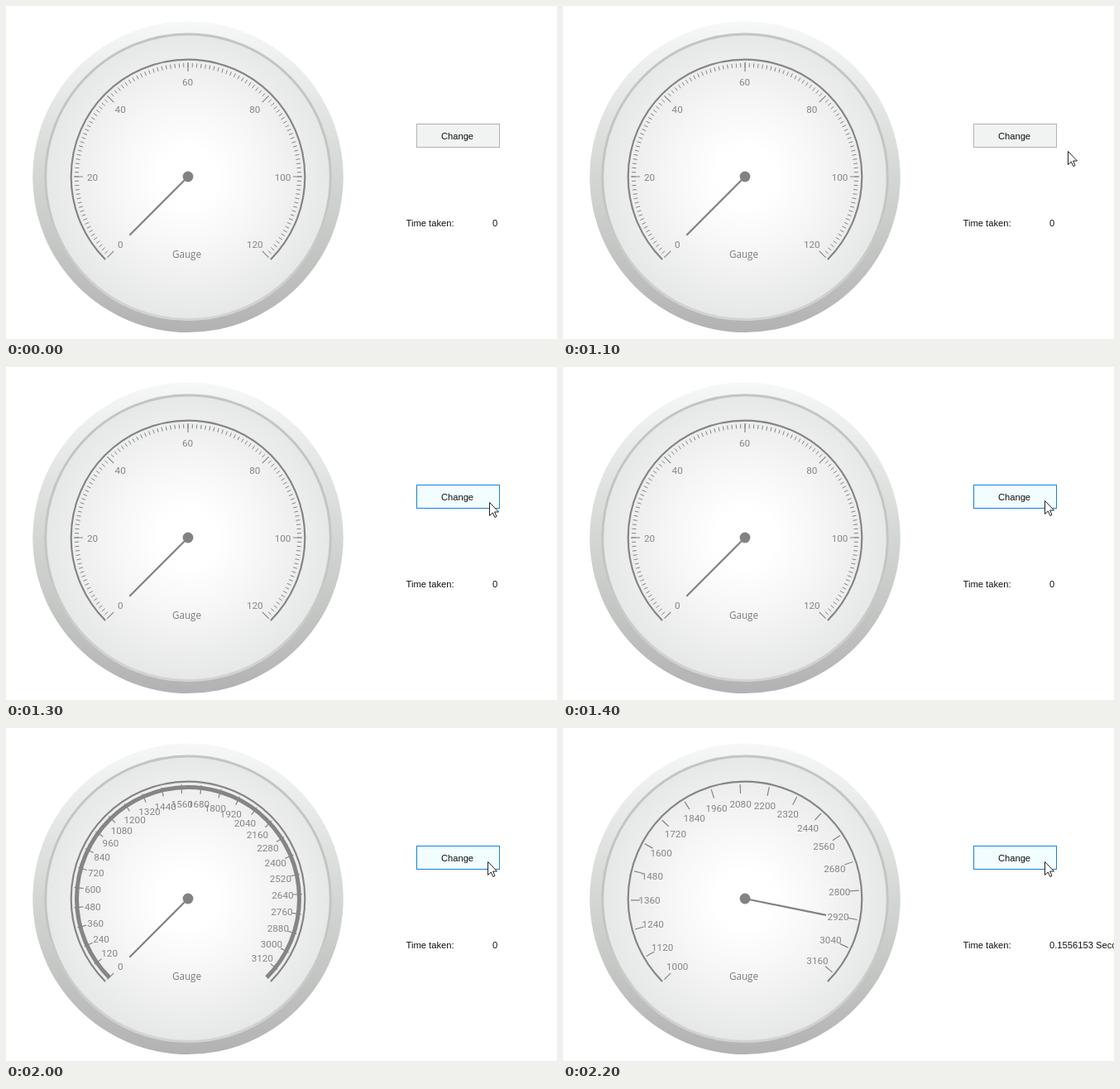
Write an HTML page that moves like this. It is 666 px wide and 402 px high and loops after 5100 ms.

```html
<!DOCTYPE html>
<html lang="en">
<head>
<meta charset="utf-8">
<title>Gauge</title>
<style>
html, body { margin: 0; height: 100%; overflow: hidden; background: #fff; }
svg { display: block; width: 666px; height: 402px; }
.form { font: 11.2px "Liberation Sans", Arial, sans-serif; fill: #111; }
.caption { font: 11.7px "Open Sans", sans-serif; fill: #7b7b7b; text-anchor: middle; }
.scale text { font: 11.7px Roboto, sans-serif; fill: #858585; text-anchor: middle; }
.scale path { fill: none; stroke: #858585; }
</style>
</head>
<body>
<svg viewBox="0 0 666 402">
  <defs>
    <linearGradient id="bezel" x2="0" y2="1">
      <stop stop-color="#f6f8f8"/>
      <stop offset=".5" stop-color="#d3d7d3"/>
      <stop offset="1" stop-color="#b2b2b2"/>
    </linearGradient>
    <linearGradient id="rim" x2="0" y2="1">
      <stop stop-color="#c3c5c4"/>
      <stop offset=".6" stop-color="#c3c5c4"/>
      <stop offset="1" stop-color="#d3d3d3"/>
    </linearGradient>
    <radialGradient id="face">
      <stop offset=".2" stop-color="#fff"/>
      <stop offset=".5" stop-color="#f7f7f8"/>
      <stop offset="1" stop-color="#e6e7e7"/>
    </radialGradient>
  </defs>
  <circle cx="220" cy="206.3" r="187.7" fill="url(#bezel)"/>
  <circle cx="220" cy="206.3" r="172.3" fill="url(#face)" stroke="url(#rim)" stroke-width="3"/>
  <g id="scales"></g>
  <text class="caption" x="218.5" y="304">Gauge</text>
  <path id="needle" d="M220 206V106" stroke="#828282" stroke-width="2.2"/>
  <circle cx="220" cy="206" r="6.4" fill="#828282"/>
  <g class="form">
    <rect id="button" x="496.5" y="142.5" width="100" height="28"/>
    <text x="545.5" y="161" text-anchor="middle">Change</text>
    <text x="483.5" y="266">Time taken:</text>
    <text id="result" x="588" y="266"></text>
  </g>
  <path id="cursor" d="M.5 .5V16.5L4.3 13L6.8 18.5L9 17.5L6.6 12H11.5Z" fill="#fff" stroke="#222"/>
</svg>
<script>
const $ = id => document.getElementById(id);
const LOOP = 5100, START = -135, SWEEP = 270;

function polar(deg, r) {
  const a = deg * Math.PI / 180;
  return [220 + r * Math.sin(a), 206 + r * Math.cos(a) * -1].map(n => n.toFixed(2));
}
const line = (deg, r1, r2) => `M${polar(deg, r1)}L${polar(deg, r2)}`;
const arc = r => `M${polar(START, r)}A${r} ${r} 0 1 1 ${polar(-START, r)}`;

function scale(min, max, step, minor) {
  const angle = v => START + (v - min) / (max - min) * SWEEP;
  let ticks = '', small = '', labels = '';
  for (let v = min; v <= max; v += step) {
    const [x, y] = polar(angle(v), 115);
    ticks += line(angle(v), 127, 138);
    labels += `<text x="${x - .5}" y="${+y + 4.6}">${v}</text>`;
  }
  if (minor === 'ticks') for (let v = min; v <= max; v++) small += line(angle(v), 132, 137);
  const band = minor === 'band' ? `<path d="${arc(134.5)}" stroke-width="5"/>` : '';
  return `<g class="scale"><path d="${arc(141.3)}" stroke-width="2.2"/>
    <path d="${ticks}" stroke-width="1.2"/><path d="${small}"/>${band}${labels}</g>`;
}

$('scales').innerHTML =
  scale(0, 120, 20, 'ticks') + scale(0, 3200, 120, 'band') + scale(1000, 3200, 120);
const scales = [...$('scales').children];

// Cursor tip every 100 ms, from 900 ms on
const tips = [[664, 195], [638, 186], [610, 175], [588, 167], [584, 163], [582, 161]];
const looks = {
  idle: ['#f1f3f2', '#adb3b3'],
  hover: ['#f2fdff', '#1583d8'],
  down: ['#daf4ff', '#1765ad']
};

function draw(now) {
  const t = now % LOOP;
  const tip = tips[Math.min(5, Math.floor((t - 900) / 100))];
  $('cursor').style.display = tip ? '' : 'none';
  if (tip) $('cursor').setAttribute('transform', `translate(${tip})`);

  const look = t < 1200 ? 'idle' : t >= 1900 && t < 2000 ? 'down' : 'hover';
  $('button').setAttribute('fill', looks[look][0]);
  $('button').setAttribute('stroke', looks[look][1]);

  const shown = t < 2000 ? 0 : t < 2100 ? 1 : 2;
  scales.forEach((s, i) => s.style.display = i === shown ? '' : 'none');

  const done = t >= 2200;
  $('needle').setAttribute('transform', `rotate(${done ? 101.5 : START} 220 206)`);
  $('result').textContent = done ? '0.1556153 Seconds' : '0';
  requestAnimationFrame(draw);
}
draw(performance.now());
</script>
</body>
</html>
```
